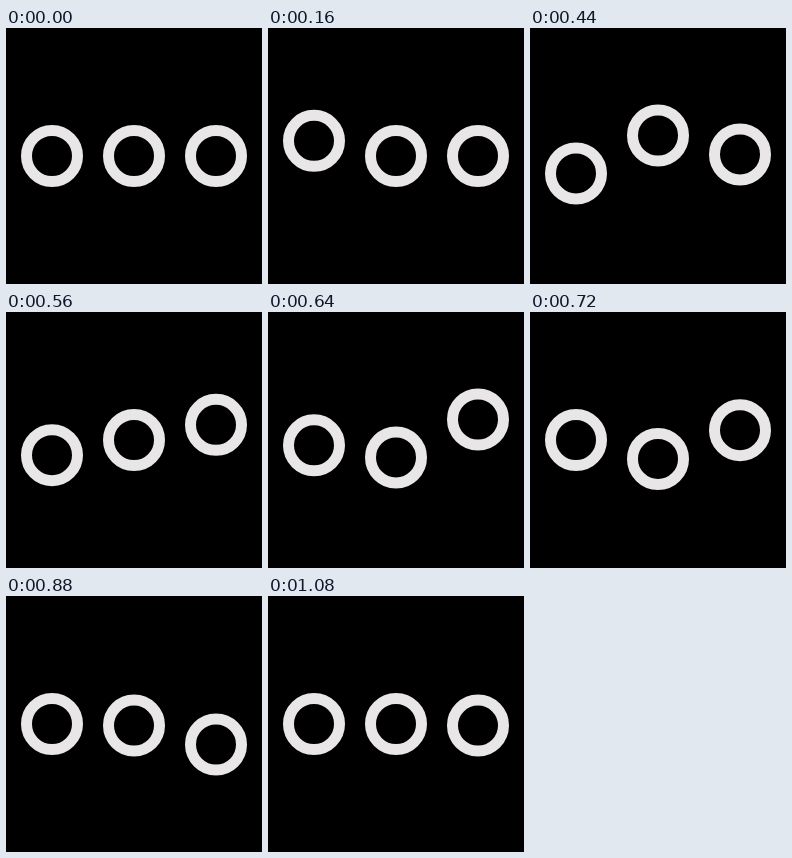
An HTML page for the animation above (1.12 s loop, 256 by 256 pixels).

```html
<!DOCTYPE html>
<html lang="en">
<head>
<meta charset="utf-8">
<title>Bouncing rings</title>
<style>
  html, body { margin: 0; height: 100%; overflow: hidden; background: #000; }
  svg { display: block; width: 100%; height: 100%; }
  circle { fill: none; stroke: #e8e6e6; stroke-width: 11; }
</style>
</head>
<body>
<svg viewBox="0 0 256 256">
  <circle cx="46" cy="128" r="25.5"/>
  <circle cx="128" cy="128" r="25.5"/>
  <circle cx="210" cy="128" r="25.5"/>
</svg>
<script>
  const LOOP = 1120, STEP = 40, DELAY = 200, PHASE = 240, REST = 128;
  const stops = [0, -20.5, 20.5, 0];
  const rings = document.querySelectorAll('circle');
  const ease = p => p * p * (3 - 2 * p);

  // Rise, drop below the rest line, return: three equal eased phases.
  function offset(t) {
    const p = t / PHASE, i = Math.floor(p);
    if (i < 0 || i > 2) return 0;
    return stops[i] + (stops[i + 1] - stops[i]) * ease(p - i);
  }

  const start = performance.now();
  function draw() {
    const elapsed = (performance.now() - start) % LOOP;
    const t = Math.floor(elapsed / STEP) * STEP;
    rings.forEach((ring, i) => ring.setAttribute('cy', REST + offset(t - i * DELAY)));
    requestAnimationFrame(draw);
  }
  draw();
</script>
</body>
</html>
```
